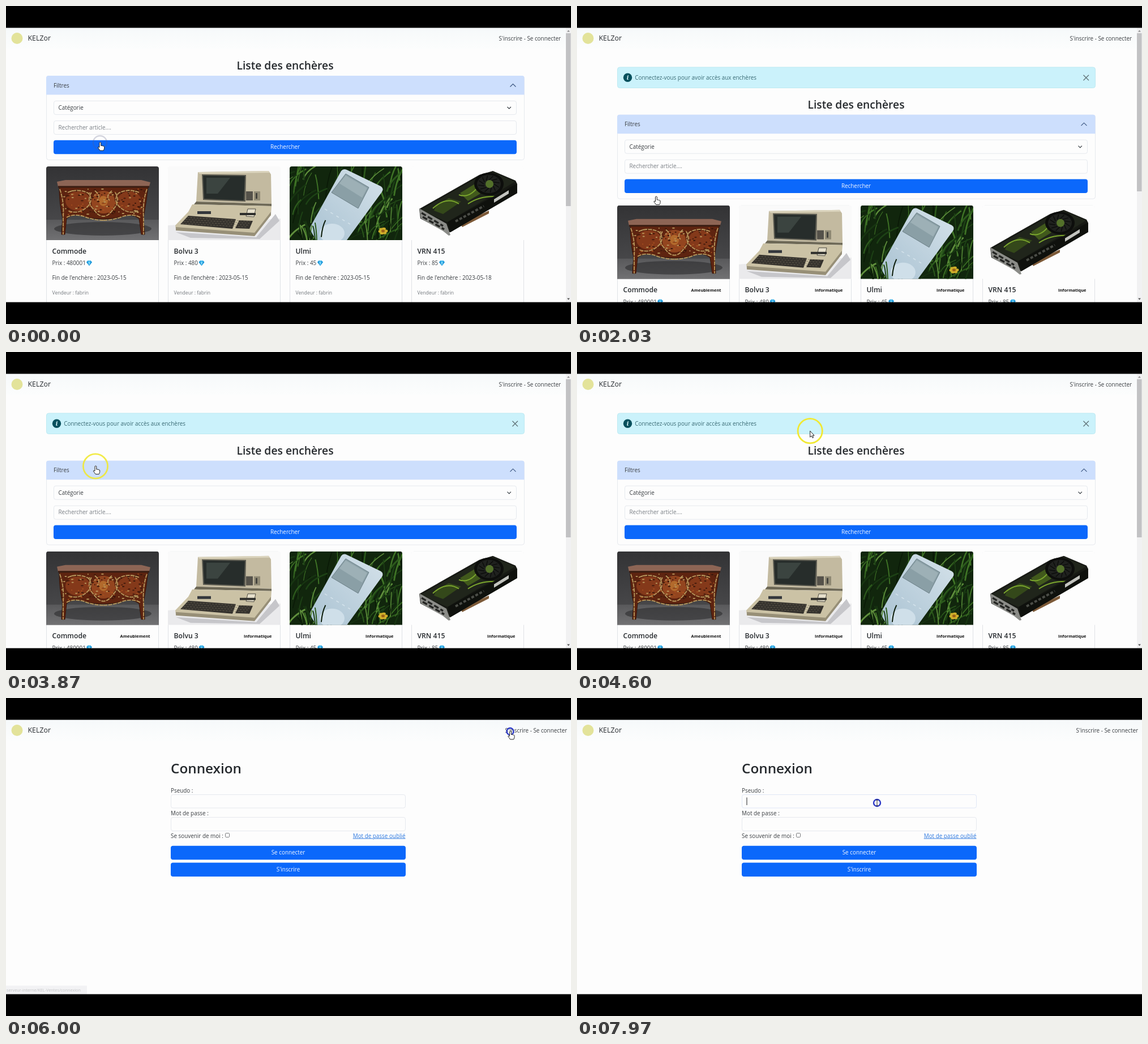
Animation, 998 px wide and 561 px high, one loop 8000 ms. Source, as an HTML page:

```html
<!DOCTYPE html>
<html lang="fr">
<head>
<meta charset="utf-8">
<title>Enchères</title>
<style>
html, body { margin: 0; width: 100%; height: 100%; overflow: hidden; background: #000; }
svg { display: block; width: 100%; height: 100%; }
text { font-family: "Open Sans", "Noto Sans", sans-serif; font-size: 9.9px; fill: #3a3e42; white-space: pre; }
</style>
</head>
<body>
<svg id="stage" viewBox="0 0 998 561"></svg>
<script>
const LOOP = 8000, ALERT_AT = 1500, LOGIN_AT = 5920, SHIFT = 68.7;
const BLUE = '#0b68fb', LINE = '#e6e9ee', INK = '#25292d';

let seed = 7;
const rnd = (a, b) => {
  seed = (seed * 16807) % 2147483647;
  return a + (b - a) * seed / 2147483647;
};

// Markup helpers
const text = (x, y, s, extra = '') => `<text x="${x}" y="${y}" ${extra}>${s}</text>`;
const rect = (x, y, w, h, fill, extra = '') =>
  `<rect x="${x}" y="${y}" width="${w}" height="${h}" fill="${fill}" ${extra}/>`;
const poly = (pts, fill, extra = '') => `<polygon points="${pts}" fill="${fill}" ${extra}/>`;
const path = (d, stroke, w, extra = '') =>
  `<path d="${d}" fill="none" stroke="${stroke}" stroke-width="${w}" ${extra}/>`;
const oval = (x, y, rx, ry, fill, extra = '') =>
  `<ellipse cx="${x}" cy="${y}" rx="${rx}" ry="${ry}" fill="${fill}" ${extra}/>`;
const box = (x, y, w, h, extra = '') =>
  rect(x + .5, y + .5, w - 1, h - 1, '#fdfdfd', `rx="3.5" stroke="${LINE}" ${extra}`);
const button = (x, y, w, label) =>
  rect(x, y, w, 24.5, BLUE, 'rx="4"') +
  text(x + w / 2, y + 15.6, label, 'text-anchor="middle" style="fill:#f4f8ff"');
const heading = (x, y, size, s, anchor = 'start') =>
  text(x, y, s, `text-anchor="${anchor}" style="font-size:${size}px;font-weight:600;fill:${INK}"`);

// Pictures, each 199 by 130
function commode() {
  const gold = '#b99a5e', dark = '#35150a';
  let s = rect(0, 0, 199, 130, 'url(#wall)') + rect(0, 94, 199, 36, 'url(#floor)');
  s += oval(100, 110, 86, 12, '#2c2c2e', 'opacity=".6"');
  s += `<path d="M23 36H180L177 60Q174 76 172 92L174 120H168L164 92Q150 82 136 88Q100 98 66 88Q48 82 36 92L33 120H27L29 92Q23 66 23 36Z" fill="#5e2410" stroke="${dark}"/>`;
  s += oval(56, 61, 22, 17, '#84391a') + oval(101, 63, 21, 20, '#93451f') + oval(147, 61, 21, 17, '#84391a');
  s += oval(101, 61, 8, 9, '#b26a2c');
  for (let i = 0; i < 150; i++)
    s += oval(rnd(28, 174).toFixed(1), rnd(40, 85).toFixed(1), rnd(1, 2.6).toFixed(1), 1,
      [dark, '#a5501f', '#421a0c', gold][i % 4]);
  s += poly('19,27 34,24 168,24 184,28 182,35 21,36', '#8d6555') + rect(21, 34.5, 161, 3, '#3a1d12');
  const half = path('M24 40Q32 62 30 90L30 120M38 46Q56 38 74 47Q84 58 74 70Q58 86 38 78M80 46Q70 62 84 76Q92 88 101 88M86 43Q98 52 90 60M36 90Q48 83 66 88Q84 95 101 95', gold, 1.8, 'stroke-dasharray="7 1.5"');
  return s + half + `<g transform="matrix(-1 0 0 1 202 0)">${half}</g>`;
}

function computer() {
  let s = rect(0, 0, 199, 130, '#fafafa') + poly('0,104 199,92 199,130 0,130', '#eaeaec');
  s += poly('14,116 156,125 190,84 197,96 162,128 40,126', '#c6c6ca');
  s += poly('53,10 178,8 182,14 183,66 50,62', '#c3baa0') + poly('53,10 178,8 180,11 56,13', '#dbd4bd');
  s += poly('60,14 138,15 137,62 62,59', '#5b5a50') + poly('62,16 136,17 134,60 64,57', '#272d2b');
  s += poly('68,20 110,20 88,48 68,48', '#3b4440');
  s += rect(138, 44, 12, 16, '#55524a') + rect(152, 44, 11, 16, '#8f8974') + rect(155, 47, 3, 10, '#45443e');
  s += poly('50,62 183,66 183,70 46,67', '#6d6856');
  s += poly('43,67 183,70 182,84 152,122 14,111 13,104 36,80', '#cbc2a5');
  s += poly('14,107 153,117 182,80 182,86 153,123 14,113', '#978f77');
  s += poly('141,75 155,75 152,89 138,88', '#e6e0cc', 'stroke="#4c4940"') + rect(127, 82, 28, 4, '#2f2f2c');
  s += rect(52, 79, 24, 5, '#34373c') + poly('36,87 120,93 114,110 22,102', '#35322d');
  s += poly('126,95 150,96 144,110 119,109', '#35322d');
  for (let r = 0; r < 4; r++)
    s += path(`M${34 - r * 3} ${90 + r * 3.6}L${146 - r * 2} ${97 + r * 3.3}`, '#716a5a', .7, 'stroke-dasharray="3.5 2"');
  return s;
}

function player() {
  let s = rect(0, 0, 199, 130, '#11260d');
  const greens = ['#1d4215', '#2c5a1c', '#0a1a07', '#3f7426', '#173511', '#5f8f3c'];
  const blade = (x, y, dx, dy, w) =>
    path(`M${x.toFixed(1)} ${y.toFixed(1)}q${(dx * .2).toFixed(1)} ${(dy * .6).toFixed(1)} ${dx.toFixed(1)} ${dy.toFixed(1)}`,
      greens[rnd(0, 6) | 0], w);
  for (let i = 0; i < 110; i++)
    s += blade(rnd(-20, 205), rnd(20, 150), rnd(-10, 45), rnd(-60, -15), rnd(1, 3).toFixed(1));
  s += '<path d="M91 8Q95 3 101 6L161 35Q167 39 163 45L101 130H47L37 114Q35 109 38 104Z" fill="url(#shell)"/>';
  s += poly('99,13 140,37 121,74 74,46', '#8a9fa6', 'stroke="#6c8087"') + poly('99,16 137,38 128,55 88,30', '#9db0b6');
  s += path('M62 75L107 102', '#d6e4ec', 1.4, 'stroke-dasharray="5 7"') + oval(75, 118, 22, 17, '#cfdfe9');
  for (let i = 0; i < 14; i++) s += blade(rnd(20, 62), rnd(122, 140), rnd(-14, 8), rnd(-38, -18), 2);
  for (let i = 0; i < 6; i++) s += oval(165 + 5 * Math.cos(i), 114 + 4 * Math.sin(i), 3.4, 2.4, '#cfae2a');
  return s + oval(165, 114, 3, 2.4, '#9c6217');
}

function board() {
  let s = rect(0, 0, 199, 130, '#fdfdfd');
  s += poly('86,101 137,78 137,83 90,107', '#7d5a38');
  s += poly('14,75 120,15 144,8 184,25 187,31 187,47 69,116 62,116 16,92', '#171914');
  s += poly('16,77 122,17 145,10 183,27 64,98', '#20251b');
  s += poly('44,68 66,56 88,62 56,84 40,78', '#34481a') + poly('86,47 112,31 122,48 100,61', '#41591c');
  s += path('M38 74Q62 52 84 66M84 50Q104 58 122 30M100 66Q120 52 150 53', '#7ba62d', 2);
  s += oval(137, 31, 26, 20, '#0d0e0c') + oval(137, 31, 21, 16, '#1f211e');
  for (let i = 0; i < 12; i++) {
    const a = i * Math.PI / 6, b = a + .4;
    s += path(`M${137 + 9 * Math.cos(a)} ${31 + 7 * Math.sin(a)}L${137 + 19 * Math.cos(b)} ${31 + 15 * Math.sin(b)}`, '#0b0c0a', 1.4);
  }
  s += '<circle cx="138" cy="31" r="7" fill="#53702a"/>';
  s += poly('64,98 185,31 187,47 69,116', '#0f110d') + path('M78 97L128 70', '#4b4d47', 4, 'stroke-dasharray="5 3"');
  s += poly('146,58 172,42 172,48 146,64', '#c3c4bf');
  s += poly('14,74 62,101 69,121 66,122 56,114 17,92', '#8b8c88') +
    path('M18 82L56 105M20 89L58 111', '#252624', 3.4, 'stroke-dasharray="9 4"');
  return s;
}

const items = [
  { name: 'Commode', price: 480001, end: '15', gem: 76, kind: 'Ameublement', draw: commode },
  { name: 'Bolvu 3', price: 480, end: '15', gem: 59.5, kind: 'Informatique', draw: computer },
  { name: 'Ulmi', price: 45, end: '15', gem: 54, kind: 'Informatique', draw: player },
  { name: 'VRN 415', price: 85, end: '18', gem: 54, kind: 'Informatique', draw: board }
];

const gem = x => poly(`${x - 5},169 ${x - 2.5},166 ${x + 2.5},166 ${x + 5},169 ${x},175.5`, '#1593d8') +
  poly(`${x - 2},169 ${x + 2},169 ${x},175`, '#7fd6f7') + poly(`${x - 2.5},166 ${x + 2.5},166 ${x + 2},169 ${x - 2},169`, '#4cbcee');

const card = (it, i) => `<g transform="translate(${71 + 215 * i} 283)">` +
  rect(.5, .5, 198, 300, '#fdfdfd', 'rx="4" stroke="#dfe2e6"') +
  `<g clip-path="url(#photo)">${it.draw()}</g>` +
  heading(10.5, 153.5, 12.2, it.name) +
  text(10.5, 174, `Prix : ${it.price}`) + gem(it.gem) +
  text(10.5, 200, `Fin de l'enchère : 2023-05-${it.end}`) +
  text(10.5, 225.8, 'Vendeur : fabrin', 'style="font-size:8.6px;fill:#74797e"') +
  `<g class="badge">${text(183.5, 152.6, it.kind, 'text-anchor="end" style="font-size:7.45px;font-weight:700;fill:#111"')}</g></g>`;

const list = `<g id="list">` +
  heading(493, 112, 19.3, 'Liste des enchères', 'middle') +
  rect(71.5, 123.5, 844, 148, '#fdfdfd', `rx="4" stroke="${LINE}"`) +
  '<path d="M71 156.5V127Q71 123 75 123H911.5Q915.5 123 915.5 127V156.5Z" fill="#cddffd"/>' +
  text(84, 143.5, 'Filtres') + path('M890.5 142.5L895.5 137.5L900.5 142.5', '#35507c', 1.1) +
  box(84, 167, 818, 25) + text(92.5, 183, 'Catégorie') + path('M885.5 178L888.7 181.2L891.9 178', '#343a40', 1.2) +
  box(84, 202, 818, 25) + text(92.5, 217.8, 'Rechercher article....', 'style="fill:#7a7f85"') +
  button(84, 236.8, 818, 'Rechercher') + items.map(card).join('') + '</g>';

const alertBar = `<g id="alert">` +
  rect(71.5, 108, 844, 36.5, '#cbf2fb', 'rx="4" stroke="#bdeaf2"') +
  '<circle cx="89.5" cy="126.3" r="7.7" fill="#07505d"/>' +
  text(89.5, 130.2, 'i', 'text-anchor="middle" style="font:italic 700 11px \'Noto Serif\',serif;fill:#d9f6fb"') +
  text(102.3, 130.3, 'Connectez-vous pour avoir accès aux enchères', 'style="fill:#3a6b75"') +
  path('M894.5 121.7L904 131.2M904 121.7L894.5 131.2', '#62757a', 1.4) + '</g>';

const scrollbar = `<g id="scroll">${rect(989, 38, 9, 485, '#f1f1f2')}
  <rect id="thumb" x="989" y="48" width="8.5" fill="#c2c2c4"/>
  ${poly('991,45.5 996,45.5 993.5,42.5', '#8d8d8f')}${poly('991,515.5 996,515.5 993.5,518.5', '#555')}</g>`;

const login = `<g id="login">` +
  heading(291, 133, 24.3, 'Connexion') +
  text(291, 166.5, 'Pseudo :') + box(291, 170, 415, 24.5, 'id="field"') +
  text(291, 206.5, 'Mot de passe :') + box(291, 210, 415, 25) +
  text(291, 246.5, 'Se souvenir de moi :') +
  rect(387.5, 238.5, 7, 7, '#fff', 'rx="1.2" stroke="#77797c"') +
  text(705.5, 246.5, 'Mot de passe oublié', 'text-anchor="end" text-decoration="underline" style="fill:#2f7ae0"') +
  button(291, 260.8, 415, 'Se connecter') + button(291, 290.4, 415, "S'inscrire") +
  rect(299.5, 175.5, 1, 13.5, '#222', 'id="caret"') + '</g>';

const nav = rect(0, 38, 998, 38, 'url(#bar)') +
  '<circle cx="19.5" cy="57" r="10" fill="#e3e39a"/>' +
  text(38.5, 60.6, 'KELZor', `style="font-size:12.4px;fill:${INK}"`) +
  text(980, 60.5, "S'inscrire - Se connecter", 'id="links" text-anchor="end"');

const status = `<g id="status">${rect(0, 507.5, 143, 15, '#ececee')}
  ${text(1, 518, 'serveur-interne/KEL-Ventes/connexion', 'style="font-size:7.3px;fill:#9a9ca0"')}</g>`;

const cursors = `<g id="cursor">
  <path id="hand" transform="translate(.4 -.6)" d="M-1.4 .8Q0 -1 1.4 .8V6.2Q2.9 5.4 3.6 6.5Q5 5.8 5.7 7Q7 6.6 7.2 8.2V10.5Q7 12.6 5.8 14.6H-.3Q-2 11.8 -4 9.4Q-4.4 7.3 -1.4 9Z" fill="#fff" stroke="#222"/>
  <path id="arrow" d="M0 0V11L2.5 8.7L4.3 12.4L6 11.6L4.3 8H7.4Z" fill="#fff" stroke="#222"/>
  <path id="beam" d="M-2 -5H2M0 -5V5M-2 5H2" stroke="#333"/></g>`;

const fadeDown = (id, from, to, extra = 'x2="0" y2="1"') =>
  `<linearGradient id="${id}" ${extra}><stop offset="0" stop-color="${from}"/><stop offset="1" stop-color="${to}"/></linearGradient>`;

const stage = document.getElementById('stage');
stage.innerHTML = `<defs>
  ${fadeDown('bar', '#f6f9fa', '#fcfdfd')}${fadeDown('wall', '#333335', '#4e4e50')}
  ${fadeDown('floor', '#59595b', '#717173')}${fadeDown('shell', '#d5e2ea', '#a9c2d2', 'x1="1" x2="0" y2="1"')}
  <clipPath id="photo"><path d="M0 130V4Q0 0 4 0H195Q199 0 199 4V130Z"/></clipPath></defs>
  ${rect(0, 0, 998, 561, '#fdfdfd')}${list}${alertBar}${login}${nav}${scrollbar}${status}
  <circle id="halo" r="21.6" fill="none" stroke="#f1e933" stroke-width="2.8"/>
  <circle id="click" fill="none" stroke-width="2.4"/>
  ${cursors}${rect(0, 0, 998, 38.5, '#000')}${rect(0, 522.5, 998, 38.5, '#000')}`;

const $ = id => document.getElementById(id);
const set = (id, attrs) => { for (const k in attrs) $(id).setAttribute(k, attrs[k]); };
const show = (el, on) => { el.style.display = on ? '' : 'none'; };
const clamp = v => Math.max(0, Math.min(1, v));
const badges = document.querySelectorAll('.badge');

// Pointer stops: time, x, y
const stops = [[0, 166, 241], [600, 166, 241], [1000, 139.5, 336.5], [3550, 139.5, 336.5], [3870, 158, 201.5],
  [4150, 190, 175], [5270, 813, 74.5], [5560, 890.5, 59], [6500, 890.5, 59], [7600, 530, 185], [8000, 530, 185]];
const clicks = [-550, 1200, 5650, 7750];
const moves = [[600, 1200], [3550, 5650], [6500, 7750]];

function pointer(t) {
  let i = 1;
  while (i < stops.length - 1 && t > stops[i][0]) i++;
  const [t0, x0, y0] = stops[i - 1], [t1, x1, y1] = stops[i];
  const p = clamp((t - t0) / (t1 - t0)), e = p * p * (3 - 2 * p);
  return [x0 + (x1 - x0) * e, y0 + (y1 - y0) * e];
}

function shape(x, y, onLogin, dy) {
  if (onLogin && x > 291 && x < 706 && y > 170 && y < 195) return 'beam';
  if (x > (onLogin ? 881 : 870) && y > 48 && y < 67) return 'hand';
  const v = y - dy;
  const active = x > 71 && x < 915 && ((v > 123 && v < 156) || v > 237);
  return active && !onLogin ? 'hand' : 'arrow';
}

function draw(t) {
  const onLogin = t >= LOGIN_AT, alerted = t >= ALERT_AT, dy = alerted ? SHIFT : 0;
  show($('list'), !onLogin);
  show($('alert'), alerted && !onLogin);
  show($('scroll'), !onLogin);
  show($('login'), onLogin);
  badges.forEach(b => show(b, alerted));
  set('list', { transform: `translate(0 ${dy})` });
  set('thumb', { height: alerted ? 279 : 305 });
  set('links', { x: onLogin ? 991 : 980 });
  set('status', { opacity: clamp((t - 5500) / 150) * clamp((6150 - t) / 250) });

  const focused = t >= 7800;
  set('field', { stroke: focused ? '#e0e7f6' : LINE });
  show($('caret'), focused);

  const [x, y] = pointer(t), kind = shape(x, y, onLogin, dy);
  set('cursor', { transform: `translate(${x} ${y})` });
  for (const id of ['hand', 'arrow', 'beam']) show($(id), id === kind);

  const move = moves.find(m => t >= m[0] && t < m[1]);
  set('halo', { cx: x, cy: y, opacity: move ? clamp((t - move[0]) / 360) : 0 });

  // A click closes the ring, holds it, then lets it spread and fade
  const age = t - clicks.filter(c => c <= t).pop();
  const close = clamp(age / 100), fade = clamp((age - 400) / 300);
  set('click', {
    cx: x, cy: y, r: 22 - 16 * close + 12 * fade, opacity: (1 - fade) ** 2,
    stroke: fade > 0 ? '#5a5f80' : '#2b38c6'
  });
}

const start = performance.now();
function tick() {
  draw((performance.now() - start) % LOOP);
  requestAnimationFrame(tick);
}
tick();
</script>
</body>
</html>
```
